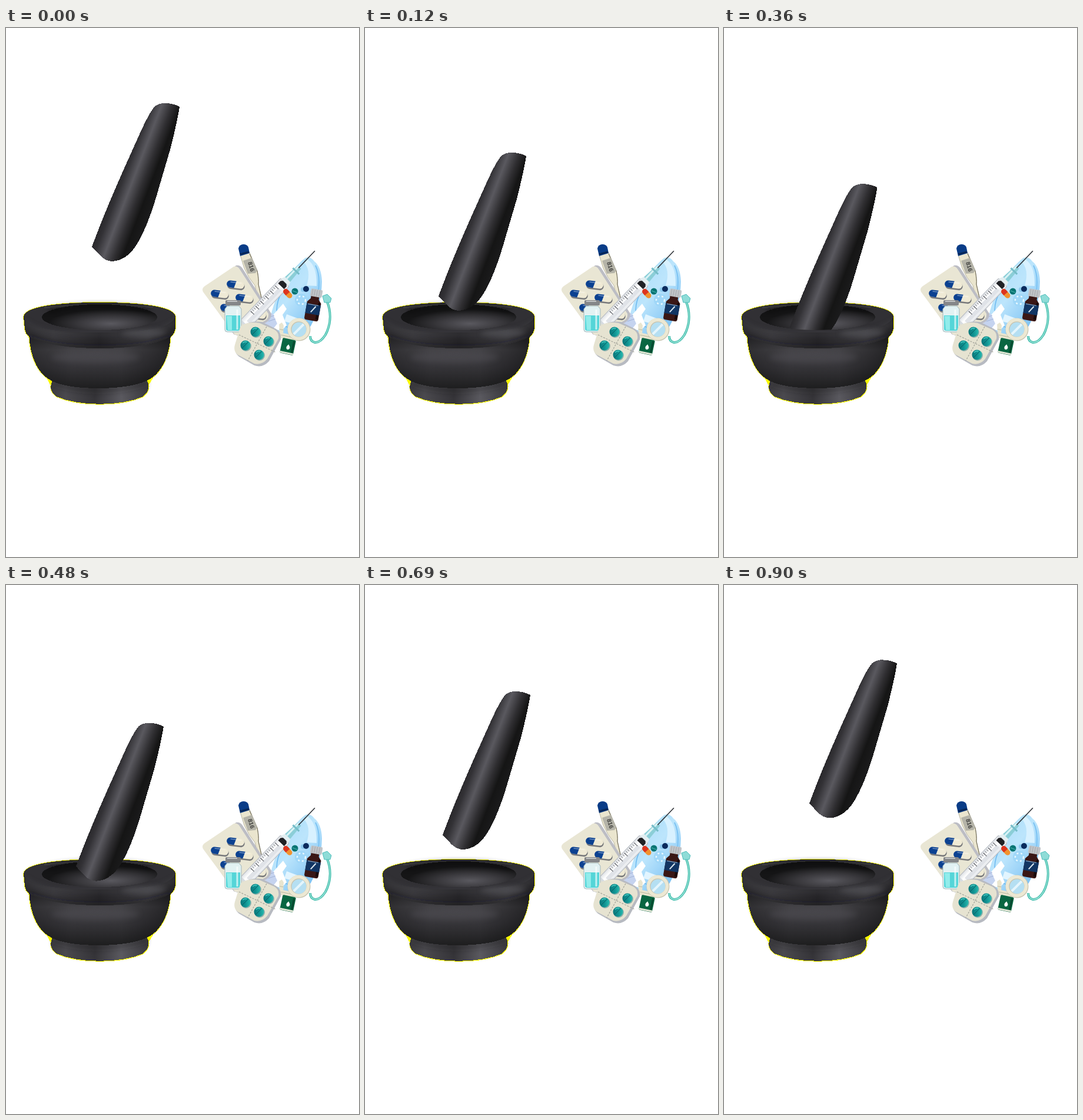
These frames come from a looping animation (600x900 px, 0.93 s). An HTML page:

```html
<!DOCTYPE html>
<html lang="en">
<head>
<meta charset="utf-8">
<title>Mortar and pestle</title>
<style>
  html, body { margin: 0; width: 100%; height: 100%; overflow: hidden; background: #fff; }
  svg { display: block; width: 600px; height: 900px; }
</style>
</head>
<body>
<svg viewBox="0 0 600 900">
  <defs>
    <linearGradient id="pestleShade" gradientUnits="userSpaceOnUse" x1="159" y1="338" x2="227" y2="364">
      <stop offset="0" stop-color="#29282b"/><stop offset=".12" stop-color="#333236"/>
      <stop offset=".34" stop-color="#5a595f"/><stop offset=".58" stop-color="#2f2e31"/>
      <stop offset=".76" stop-color="#151515"/><stop offset="1" stop-color="#1b1b1c"/>
    </linearGradient>
    <linearGradient id="bodyShade" x2="0" y2="1">
      <stop offset="0" stop-color="#2c2b2e"/><stop offset=".3" stop-color="#434246"/>
      <stop offset=".6" stop-color="#363539"/><stop offset="1" stop-color="#1e1e1f"/>
    </linearGradient>
    <linearGradient id="sideShade">
      <stop offset="0" stop-opacity=".3"/><stop offset=".3" stop-opacity="0"/>
      <stop offset=".65" stop-opacity="0"/><stop offset="1" stop-opacity=".45"/>
    </linearGradient>
    <linearGradient id="footShade">
      <stop offset="0" stop-color="#3b3a3e"/><stop offset=".15" stop-color="#4a494e"/>
      <stop offset=".45" stop-color="#353438"/><stop offset=".72" stop-color="#5a595f"/><stop offset="1" stop-color="#38373b"/>
    </linearGradient>
    <linearGradient id="rimShade">
      <stop offset="0" stop-color="#2c2b2e"/><stop offset=".2" stop-color="#38373b"/>
      <stop offset=".5" stop-color="#252427"/><stop offset=".82" stop-color="#3c3b3f"/><stop offset="1" stop-color="#242326"/>
    </linearGradient>
    <radialGradient id="hollowShade" cx=".6" cy=".75" r=".55">
      <stop offset="0" stop-color="#5a595f"/><stop offset=".5" stop-color="#39383c"/><stop offset="1" stop-color="#151516"/>
    </radialGradient>
    <linearGradient id="maskShade" x2=".8" y2="1">
      <stop offset="0" stop-color="#a4daf8"/><stop offset=".5" stop-color="#bce5fc"/><stop offset="1" stop-color="#72bcf2"/>
    </linearGradient>
    <linearGradient id="barrelShade" x2="0" y2="1">
      <stop offset="0" stop-color="#dfe2e6"/><stop offset=".4" stop-color="#fff"/><stop offset="1" stop-color="#e6e9ed"/>
    </linearGradient>
    <linearGradient id="tealShade">
      <stop offset="0" stop-color="#0b777a"/><stop offset=".5" stop-color="#0f9191"/><stop offset="1" stop-color="#27b9ae"/>
    </linearGradient>
    <filter id="soft" x="-50%" y="-100%" width="200%" height="300%"><feGaussianBlur stdDeviation="5"/></filter>
    <clipPath id="aboveLip"><path d="M0 0H600V492H257A98 22 0 0 1 61 492H0Z"/></clipPath>
    <clipPath id="rimClip"><use href="#rim"/></clipPath>

    <path id="foot" d="M80 598C73 611 76 620 86 627C123 644 196 644 233 627C244 619 245 608 239 598Z"/>
    <path id="body" d="M39 520C41 565 57 590 77 600Q102 613 160 613Q220 612 245 597C264 586 279 558 280 520Z"/>
    <path id="rim" d="M30 492C30 474 88 467 159 467S288 474 288 492V508Q288 520 279 526Q239 545 159 545Q80 545 41 526Q33 521 32 512Z"/>

    <g id="capsule">
      <rect x="-14" y="-5" width="30" height="13" rx="6.5" fill="#77787a"/>
      <rect x="-15" y="-6.5" width="30" height="12" rx="6" fill="#efead5"/>
      <path d="M1-6.5H-9a6 6 0 0 0 0 12H-2Z" fill="#0b4191"/>
      <path d="M-9-4H10" stroke="#fff" stroke-width="1.5" opacity=".4"/>
    </g>
    <g id="tablet">
      <circle cx="1" cy="1" r="9" fill="#8fb0ac"/>
      <circle r="8.5" fill="url(#tealShade)"/>
      <path d="M-6 5L5-6" stroke="#075f63"/>
      <path d="M-5-4Q-2-7 2-6" fill="none" stroke="#4bcac2" stroke-width="1.3"/>
    </g>
  </defs>

  <g id="mortar" shape-rendering="crispEdges">
    <g fill="#ff0" stroke="#ff0" stroke-width="1.8">
      <use href="#rim"/><use href="#body"/><use href="#foot"/>
      <path stroke="none" d="M67 591L75 607L87 604ZM253 590L243 607L233 604Z"/>
    </g>
    <use href="#foot" fill="url(#footShade)"/>
    <path d="M80 605Q160 628 240 604" fill="none" stroke="#1b1b1d" stroke-width="5" opacity=".6" filter="url(#soft)"/>
    <use href="#body" fill="url(#bodyShade)"/>
    <use href="#body" fill="url(#sideShade)"/>
    <ellipse cx="152" cy="560" rx="75" ry="10" fill="#58575d" opacity=".35" filter="url(#soft)"/>
    <use href="#rim" fill="url(#rimShade)"/>
    <g clip-path="url(#rimClip)">
      <path d="M30 492C40 515 100 518 159 518S278 515 288 492V460H30Z" fill="#313034"/>
      <path d="M31 499C50 520 100 521 159 521S268 519 288 499" fill="none" stroke="#4a494e" stroke-width="5" opacity=".6" filter="url(#soft)"/>
      <ellipse cx="235" cy="519" rx="38" ry="6" fill="#57565b" opacity=".6" filter="url(#soft)"/>
      <path d="M65 476Q150 466 250 475" fill="none" stroke="#4b4a4f" stroke-width="3" opacity=".5"/>
      <path d="M38 526Q80 544 160 544T280 526" fill="none" stroke="#19191a" stroke-width="4" filter="url(#soft)"/>
    </g>
    <ellipse cx="159" cy="492" rx="98" ry="22" fill="url(#hollowShade)"/>
    <path d="M72 482Q105 472 160 472T245 481" fill="none" stroke="#070707" stroke-width="6" opacity=".5" filter="url(#soft)"/>
  </g>

  <g clip-path="url(#aboveLip)">
    <path id="pestle" shape-rendering="crispEdges" fill="url(#pestleShade)" d="M146 372L159 338Q176 295 199 243L225 185Q241 149 250 137Q254 130 266 128Q282 127 295 134Q291 160 279 207L259 275Q244 328 228 358Q209 396 180 397Q169 396 161 388Z"/>
  </g>

  <g id="supplies">
    <!-- oxygen mask and hose -->
    <path d="M546 466C554 487 551 507 543 522Q534 536 525 535Q517 533 517 524" fill="none" stroke="#39baa9" stroke-width="4"/>
    <path d="M546 466C554 487 551 507 543 522Q534 536 525 535Q517 533 517 524" fill="none" stroke="#a3e6da" stroke-width="1.4"/>
    <path d="M538 456L546 453L553 460L551 467L541 467Z" fill="#8edcd7" stroke="#4dbdbb"/>
    <path d="M509 391Q518 388 524 397Q536 406 537 431Q536 474 518 507Q503 527 481 526Q455 521 448 499Q455 461 474 434Q490 405 509 391Z" fill="url(#maskShade)"/>
    <path d="M513 394Q529 406 528 439L511 438Q519 413 507 399Z" fill="#d8f1ff"/>
    <path d="M526 404Q538 428 526 470Q513 506 486 522" fill="none" stroke="#7cc3f3" stroke-width="2"/>
    <path d="M470 447Q454 474 464 500Q478 516 504 505" fill="none" stroke="#6cb9f0" stroke-width="1.5"/>
    <path d="M477 487L509 499L497 506L473 499Z" fill="#e2f5ff"/>
    <circle cx="502" cy="463" r="11" fill="#a0d7f8"/>
    <circle cx="502" cy="463" r="7" fill="none" stroke="#e9f8ff" stroke-width="2.5" stroke-dasharray="3 4"/>
    <path d="M471 469L455 487L449 511L468 515L477 506L470 488L477 478Z" fill="#fff"/>
    <path d="M441 490L453 485L461 503L454 512L440 508Z" fill="#c5d3ef"/>
    <path d="M444 493L456 489M446 499L458 495" stroke="#a2b3d8"/>

    <!-- thermometer -->
    <path d="M398 386L414 382L427 413Q430 428 429 436L437 470L431 471L423 438Q412 425 405 409Z" fill="#eae5ce" stroke="#aaa793" stroke-width=".8"/>
    <path d="M414 384L427 413Q430 428 429 436L436 467" fill="none" stroke="#6b6551"/>
    <path d="M395 375Q396 369 403 368Q410 368 412 373L414 383L398 388Z" fill="#093c87"/>
    <path d="M398 385L413 381" stroke="#062758" stroke-width="3"/>
    <path d="M403 396L418 391L427 412L424 417L411 418Z" fill="#b4b3a8"/>
    <text transform="translate(411 399) rotate(73)" font-family="'Liberation Sans', sans-serif" font-size="10" font-weight="700" fill="#3f3f3d">816</text>

    <!-- capsule sheet -->
    <path d="M391 404Q398 403 402 409L451 486Q451 494 445 499L402 526L387 521L338 450Z" fill="#bcbdc4"/>
    <path d="M387 406Q393 404 397 410L446 486Q447 493 442 497L397 522Q390 524 386 518L335 449Q332 443 338 439Z" fill="#e9e6d4"/>
    <use href="#capsule" transform="translate(390 437) rotate(7)"/>
    <use href="#capsule" transform="translate(363 453) rotate(7)"/>
    <use href="#capsule" transform="translate(405 460) rotate(7)"/>
    <use href="#capsule" transform="translate(379 477) rotate(7)"/>
    <use href="#capsule" transform="translate(427 488) rotate(7)"/>

    <!-- syringe, needle pointing along +x -->
    <g transform="translate(402 508) rotate(-46.3)">
      <path d="M-6-10V10M-6 0H8" stroke="#c8ccd1" stroke-width="4"/>
      <rect x="6" y="-10" width="98" height="20" rx="2" fill="url(#barrelShade)" stroke="#b6bbc2"/>
      <path d="M5-17V17" stroke="#d7dce1" stroke-width="4"/>
      <path d="M12 2H90" stroke="#e0e3e8" stroke-width="7"/>
      <path d="M28-6H91" stroke="#85888e" stroke-width="4" stroke-dasharray="1 3"/>
      <path d="M28-4H91" stroke="#505258" stroke-width="8" stroke-dasharray="1 11"/>
      <path d="M95-7H101L105-3V3L101 7H95Z" fill="#202125"/>
      <path d="M104-9L112-6V6L104 9Z" fill="#e2eef1"/>
      <path d="M111-6L140-4V4L111 6Z" fill="#8bced7"/>
      <path d="M111-2H140" stroke="#d7f2f5" stroke-width="3"/>
      <path d="M131-7V8" stroke="#76bdc9" stroke-width="3"/>
      <path d="M138 0H178" stroke="#303439" stroke-width="1.6"/>
    </g>

    <!-- vial -->
    <path d="M376 473H396L400 478V514Q399 517 395 517H376Q372 517 372 513V478Z" fill="#e2f2f3" stroke="#a0b6ba"/>
    <path d="M374 489H398V512Q398 515 394 515H378Q374 515 374 512Z" fill="#54d5d8"/>
    <path d="M375 490H384V514H377Z" fill="#91eceb"/>
    <path d="M393 479V513" stroke="#fff" stroke-width="3" opacity=".65"/>
    <rect x="373" y="463" width="26" height="9" rx="2" fill="#858789"/>
    <path d="M376 465H393" stroke="#c2c4c5" stroke-width="2"/>

    <!-- loose pills -->
    <g transform="translate(479 452) rotate(48)">
      <rect x="-9" y="-4.5" width="18" height="9" rx="4.5" fill="#f1922e"/>
      <path d="M0-4.5H-5a4.5 4.5 0 0 0 0 9H0Z" fill="#dc351f"/>
    </g>
    <circle cx="491" cy="448" r="5.5" fill="#087474"/>
    <path d="M487 447L495 450" stroke="#53bcb2"/>
    <circle cx="505" cy="445" r="4" fill="#8dc9ee"/>
    <circle cx="510" cy="444" r="5" fill="#0b2b5d"/>

    <!-- brown bottle -->
    <g transform="translate(522 477) rotate(10)">
      <path d="M-7-21H7V-16L12-10V18Q12 21 8 21H-9Q-12 21-12 17V-10L-7-16Z" fill="#3a1715"/>
      <path d="M9-11V18" stroke="#180a0a" stroke-width="4"/>
      <rect x="-12" y="-7" width="24" height="17" fill="#113563"/>
      <path d="M-10-6H8" stroke="#9db4ca"/>
      <path d="M-3 7L4-4" stroke="#dbe7ef" stroke-width="2"/>
      <rect x="-9" y="-33" width="20" height="13" rx="2" fill="#c1c4c7"/>
      <path d="M-6-32V-21M-2-32V-21M2-32V-21M6-32V-21" stroke="#a4a8ac"/>
    </g>

    <!-- green dropper -->
    <g transform="translate(479 540) rotate(12)">
      <path d="M-22-32L-18-36L-14-32L-12-19H4L9-10H-16Z" fill="#e9e5cf"/>
      <path d="M-20-24H-13M-15-15H7" stroke="#bab89f"/>
      <rect x="-11" y="-11" width="23" height="26" rx="2" fill="#096642"/>
      <path d="M-11 13H12" stroke="#e2e6d6" stroke-width="3"/>
      <path d="M9-9V11" stroke="#064a30" stroke-width="3"/>
      <path d="M1-2Q-4 4 0 7Q5 7 4 2Z" fill="#fff"/>
    </g>

    <!-- tape ring -->
    <circle cx="498" cy="513" r="16" fill="#b5dff2" stroke="#c6c4b0" stroke-width="7"/>
    <circle cx="497.5" cy="512.5" r="16" fill="none" stroke="#ece8d3" stroke-width="5.5"/>
    <path d="M489 521L506 504" stroke="#e4f5fc" stroke-width="4"/>

    <!-- tablet sheet -->
    <path d="M405 505Q418 498 435 500L459 512Q469 519 467 530L447 567Q436 579 422 574L396 559Q387 552 391 542Z" fill="#b7bac1"/>
    <path d="M402 505Q415 499 431 502L456 513Q465 518 463 529L444 563Q435 574 422 571L394 556Q386 550 389 539L397 513Q398 507 402 505Z" fill="#e6e3d1"/>
    <path d="M443 508L411 566M396 522L459 552" stroke="#a3a49a" stroke-width="1.2" stroke-dasharray="3 2"/>
    <use href="#tablet" x="424" y="517"/>
    <use href="#tablet" x="446" y="533"/>
    <use href="#tablet" x="407" y="540"/>
    <use href="#tablet" x="430" y="556"/>
  </g>
</svg>
<script>
  const pestle = document.getElementById("pestle");
  const STEP = 30, STEPS = 31, DOWN = 8;

  function draw() {
    const step = Math.floor(performance.now() / STEP) % STEPS;
    const rise = (step - DOWN) / (STEPS - 1 - DOWN);
    const [x, y] = step <= DOWN
      ? [-42 * step / DOWN, 168 * step / DOWN]
      : [-42 + 41 * rise, 168 - 168.5 * rise];
    pestle.setAttribute("transform", `translate(${x} ${y})`);
    requestAnimationFrame(draw);
  }
  draw();
</script>
</body>
</html>
```
